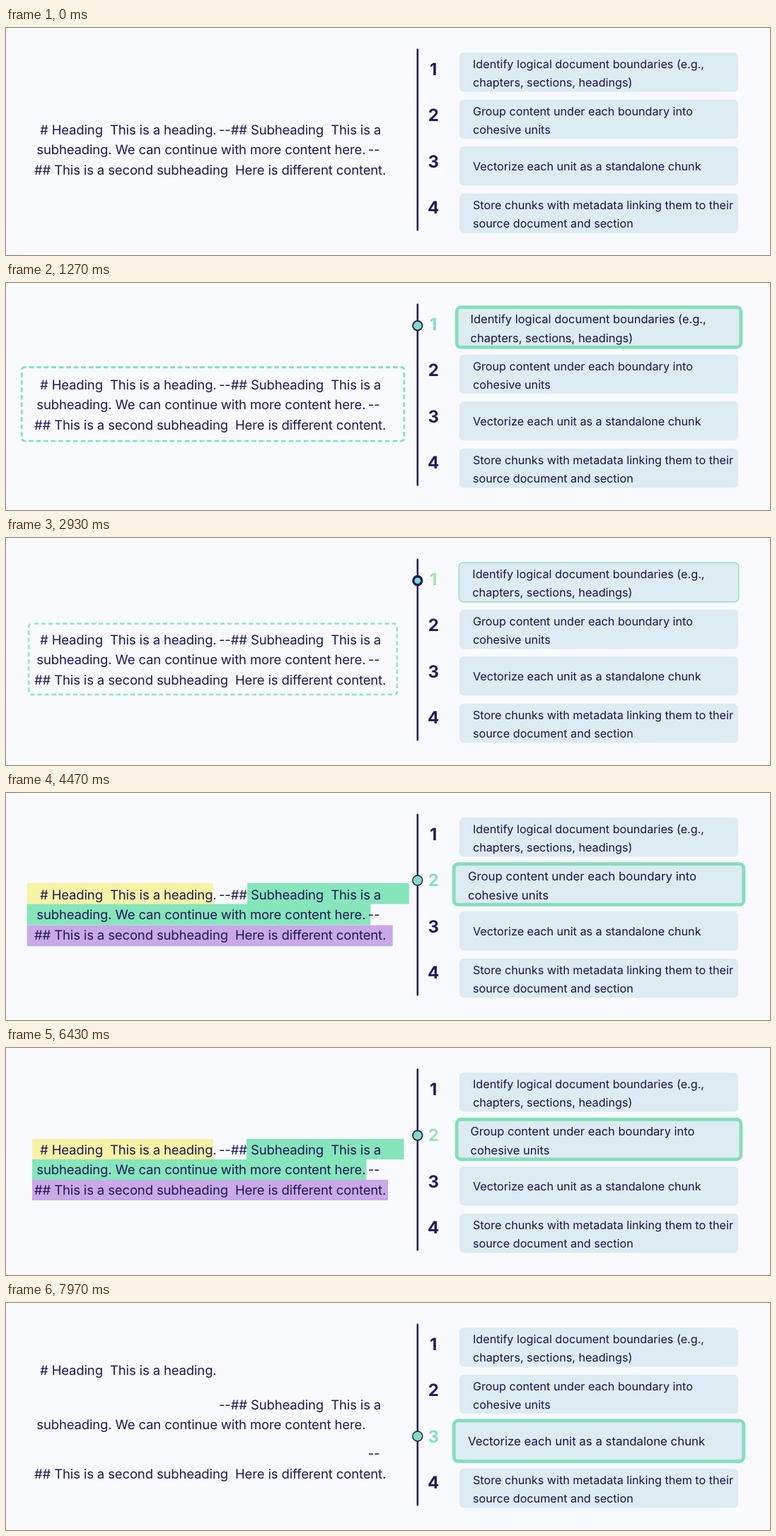
These frames come from a looping animation (1080x322 px, 8000 ms). An HTML page:

```html
<!DOCTYPE html>
<html lang="en">
<head>
<meta charset="utf-8">
<title>Chunking steps</title>
<style>
html, body { margin: 0; width: 100%; height: 100%; overflow: hidden; background: #f8fafe; }
svg { display: block; width: 1080px; height: 322px; }
text { font-family: Inter, Roboto, sans-serif; white-space: pre; text-rendering: geometricPrecision; }
.doc { font-size: 18.5px; letter-spacing: -0.14px; fill: #1f1658; }
.step { font-size: 16.17px; fill: #1a1150; }
.num { font-size: 24px; font-weight: 700; text-anchor: middle; }
</style>
</head>
<body>
<svg id="stage" viewBox="0 0 1080 322"></svg>
<script>
const NAVY = '#211a60', MINT = '#82dfba';
const stage = document.getElementById('stage');

function add(parent, tag, attrs, text) {
  const el = document.createElementNS('http://www.w3.org/2000/svg', tag);
  for (const k in attrs) el.setAttribute(k, attrs[k]);
  if (text) el.textContent = text;
  parent.appendChild(el);
  return el;
}
function set(el, attrs) { for (const k in attrs) el.setAttribute(k, attrs[k]); }

const clamp = x => Math.min(1, Math.max(0, x));
const smooth = x => (1 - Math.cos(Math.PI * clamp(x))) / 2;
const backOut = (x, c = 1.70158) => { const p = clamp(x) - 1; return 1 + (c + 1) * p ** 3 + c * p * p; };
const backIn = x => 1 - backOut(1 - clamp(x));
const zoom = (x, y, s) => `translate(${x} ${y}) scale(${s}) translate(${-x} ${-y})`;

// Value at time u from [time, value] stops
function track(stops, u, ease) {
  if (u <= stops[0][0]) return stops[0][1];
  for (let i = 1; i < stops.length; i++) {
    const [t0, a] = stops[i - 1], [t1, b] = stops[i];
    if (u < t1) {
      const k = ease((u - t0) / (t1 - t0));
      return Array.isArray(a) ? a.map((v, j) => v + (b[j] - v) * k) : a + (b - a) * k;
    }
  }
  return stops[stops.length - 1][1];
}

const SCALE = [[0, 1], [620, 1.0425], [1240, 1.0195], [1860, 1.0435], [2480, 1.0195], [3100, 1]];
const BORDER = [[0, 0], [500, 4.8], [2480, 4.8], [3150, 0]];
const CORE = [[0, 4], [620, 6.4], [1240, 5.8], [1860, 6.4], [2480, 6], [3100, 3.9]];
const DOT = [[0, 0], [300, 1], [3060, 1], [3270, 0]];
const DARK = [33, 26, 96], GREEN = [128, 228, 186];
const tint = end => [[0, DARK], [420, GREEN], [700, GREEN], [1250, [134, 217, 208]], [1860, GREEN],
  [2480, [162, 224, 182]], [2920, [168, 226, 164]], [3080, [168, 226, 164]], [end, DARK]];

// Left panel
const dash = add(stage, 'rect', { x: 22.2, y: 119.5, width: 540.6, height: 104.6, rx: 4, fill: 'none',
  stroke: '#80e4ba', 'stroke-width': 2.8, 'stroke-dasharray': '6.5 4' });
const marks = add(stage, 'g', {});
add(marks, 'path', { d: 'M37 129H293V158H37Z', fill: '#f7f3a5' });
add(marks, 'path', { d: 'M340 129H562.5V158H509.5V187H37V158H340Z', fill: '#86e5bb' });
add(marks, 'path', { d: 'M37 187H540V216H37Z', fill: '#c9a9e8' });

const doc = (parent, x, y, text) => add(parent, 'text', { x, y, class: 'doc' }, text);
const upper = add(stage, 'g', {}), lower = add(stage, 'g', {});
doc(upper, 48, 150.7, '# Heading\u00a0 This is a heading.');
doc(stage, 301, 150.7, '--## Subheading\u00a0 This is a');
doc(stage, 43.3, 179.2, 'subheading. We can continue with more content here.');
doc(lower, 511.7, 179.2, '--');
doc(lower, 40, 207.7, '## This is a second subheading\u00a0 Here is different content.');

// Right panel
add(stage, 'path', { d: 'M581.8 30.6V286.6', stroke: NAVY, 'stroke-width': 2.5, 'stroke-linecap': 'round' });
const steps = [
  { y: 35, dot: 60.5, start: 10, end: 3450, lines: ['Identify logical document boundaries (e.g.,', 'chapters, sections, headings)'] },
  { y: 101.8, dot: 124, start: 3950, end: 3270, lines: ['Group content under each boundary into', 'cohesive units'] },
  { y: 168, dot: 189, start: 7455, end: 3450, lines: ['Vectorize each unit as a standalone chunk'] },
  { y: 235, dot: 255, start: 1e6, end: 3450, lines: ['Store chunks with metadata linking them to their', 'source document and section'] }
];
steps.forEach((s, i) => {
  s.num = add(stage, 'text', { x: 604.2, y: 66.8 + i * 65.4, class: 'num' }, String(i + 1));
  s.card = add(stage, 'g', {});
  s.box = add(s.card, 'rect', { x: 641, y: s.y, width: 394, height: 55.5, rx: 6, fill: '#ddebf2',
    stroke: MINT, 'vector-effect': 'non-scaling-stroke' });
  const top = s.y + (s.lines.length > 1 ? 22 : 34);
  s.lines.forEach((line, j) => add(s.card, 'text', { x: 660, y: top + j * 26.4, class: 'step' }, line));
  s.ring = add(stage, 'circle', { cx: 581.8, cy: s.dot, fill: NAVY });
  s.core = add(stage, 'circle', { cx: 581.8, cy: s.dot, fill: MINT });
  s.tint = tint(s.end);
});

// Grow in with overshoot, then shrink away with a small wind-up
function reveal(el, u, x, y) {
  const shown = u < 2480 ? backOut(u / 830) : 1 - backIn((u - 2480) / 612);
  const alpha = u < 2480 ? clamp(u / 250) : clamp(1 - 1.6 * Math.max(0, 1 - shown));
  set(el, { transform: zoom(x, y, 0.71 + 0.29 * shown), opacity: u <= 0 || u >= 3092 ? 0 : alpha });
}

function draw(t) {
  for (const s of steps) {
    const u = t - s.start;
    const size = track(DOT, u, smooth);
    set(s.card, { transform: zoom(838, s.y + 27.75, track(SCALE, u, smooth)) });
    set(s.box, { 'stroke-width': track(BORDER, u, smooth) });
    set(s.ring, { r: 7.7 * size });
    set(s.core, { r: track(CORE, u, smooth) * size });
    set(s.num, { fill: `rgb(${track(s.tint, u, clamp).map(Math.round)})` });
  }
  reveal(dash, t - steps[0].start, 292.5, 171.8);
  set(dash, { 'stroke-dashoffset': -t * 0.03 });
  reveal(marks, t - steps[1].start, 299.7, 172.5);
  const split = backOut((t - 7249) / 820, 2.6);
  set(upper, { transform: `translate(0 ${-47.5 * split})` });
  set(lower, { transform: `translate(0 ${39.7 * split})` });
}

const born = performance.now();
function tick() {
  draw((performance.now() - born) % 8000);
  requestAnimationFrame(tick);
}
draw(0);
requestAnimationFrame(tick);
</script>
</body>
</html>
```
